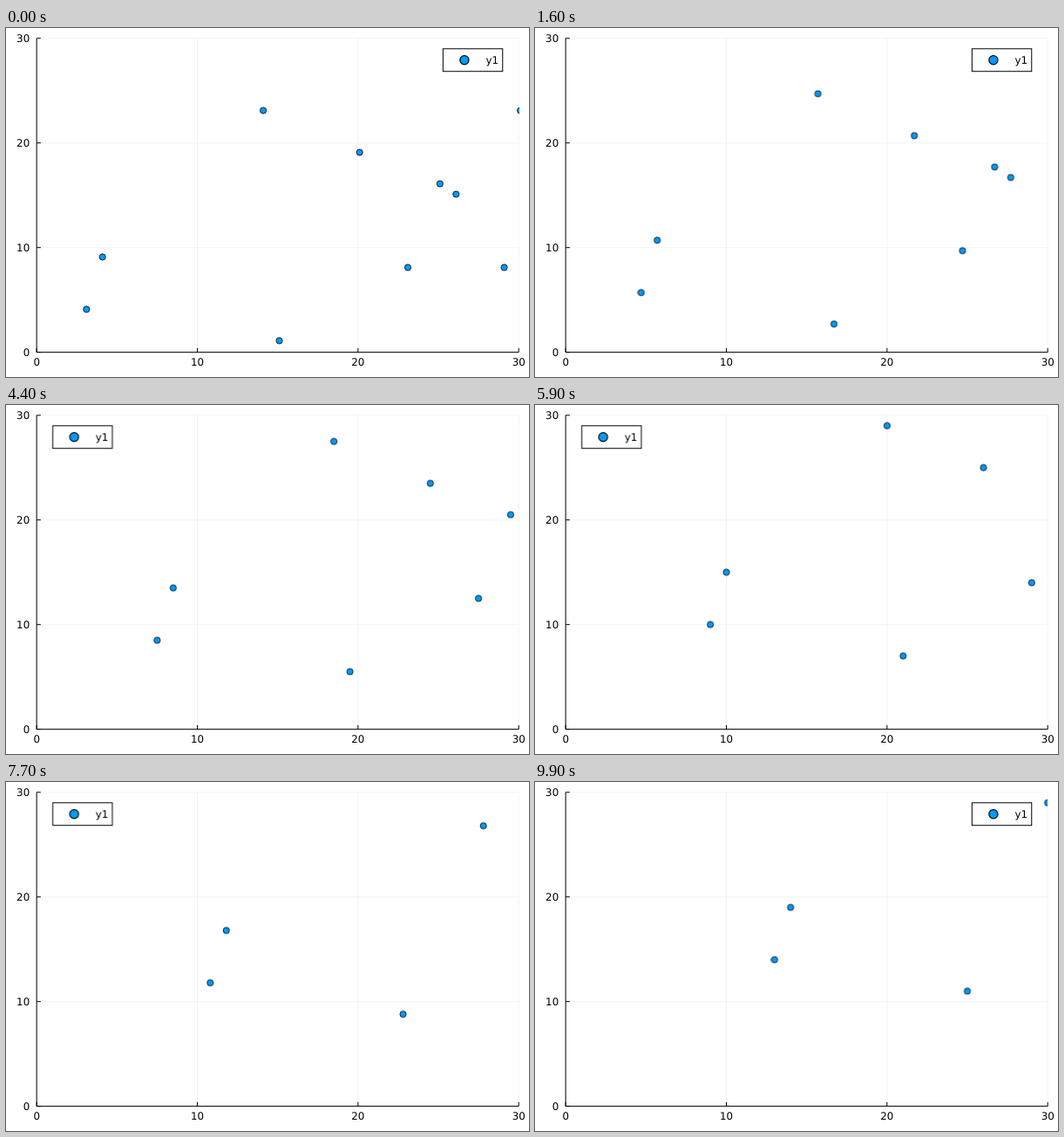
An HTML page for the animation above (10000 ms loop, 600x400 px).

```html
<!DOCTYPE html>
<html lang="en">
<head>
<meta charset="utf-8">
<title>Drifting scatter plot</title>
<style>
  html, body { margin: 0; width: 100%; height: 100%; overflow: hidden; background: #fff; }
  svg { display: block; width: 600px; height: 400px; }
  text { font: 11.86px "DejaVu Sans", Verdana, sans-serif; text-rendering: geometricPrecision; }
  .grid { stroke: #000; stroke-opacity: .1; stroke-width: .5; }
  .axis { stroke: #000; stroke-width: 1; }
  circle { fill: #009afa; stroke: #000; stroke-width: .8; }
  #points { animation: drift 10s steps(100, end) infinite; }
  #legend { animation: dodge 10s step-end infinite; }
  #legend rect { fill: #fff; stroke: #000; }
  #legend circle { stroke-width: 1.14; }

  /* Ten units right and up: one tenth of a unit per step */
  @keyframes drift {
    to { transform: translate(184.339px, -119.934px); }
  }
  /* The legend sits on the left while a point occupies the top right corner */
  @keyframes dodge {
    0%, 99%, 100% { transform: translate(0, 0); }
    34% { transform: translate(-447.73px, 0); }
  }
</style>
</head>
<body>
<svg viewBox="0 0 600 400">
  <defs>
    <clipPath id="area"><rect x="35.17" y="11.81" width="553.02" height="359.8"/></clipPath>
  </defs>
  <g id="axes"></g>
  <g clip-path="url(#area)"><g id="points"></g></g>
  <g id="legend">
    <rect x="501.34" y="23.8" width="68.42" height="25.92"/>
    <circle cx="525.9" cy="36.77" r="5.12"/>
    <text x="550.5" y="41.08">y1</text>
  </g>
</svg>
<script>
  const left = 35.17, right = 588.19, top_ = 11.81, bottom = 371.61;
  const px = v => left + v * (right - left) / 30;
  const py = v => bottom - v * (bottom - top_) / 30;

  const axes = document.getElementById('axes');
  const points = document.getElementById('points');

  function add(parent, tag, attrs, text = '') {
    const el = document.createElementNS('http://www.w3.org/2000/svg', tag);
    for (const key in attrs) el.setAttribute(key, attrs[key]);
    el.textContent = text;
    parent.append(el);
  }
  const line = (cls, x1, y1, x2, y2) => add(axes, 'line', { class: cls, x1, y1, x2, y2 });
  const label = (x, y, anchor, text) => add(axes, 'text', { x, y, 'text-anchor': anchor }, text);

  const ticks = [0, 10, 20, 30];
  for (const v of ticks) {
    line('grid', px(v), top_, px(v), bottom);
    line('grid', left, py(v), right, py(v));
  }
  line('axis', left, bottom, right, bottom);
  line('axis', left, top_, left, bottom);
  for (const v of ticks) {
    line('axis', px(v), bottom, px(v), bottom - 4.72);
    line('axis', left, py(v), left + 4.72, py(v));
    label(px(v), 387.2, 'middle', v);
    label(27.2, py(v) + 4.32, 'end', v);
  }

  const starts = [[3, 4], [4, 9], [14, 23], [15, 1], [20, 19],
                  [23, 8], [25, 16], [26, 15], [29, 8], [30, 23]];
  for (const [x, y] of starts) {
    add(points, 'circle', { cx: px(x + .1), cy: py(y + .1), r: 3.6 });
  }
</script>
</body>
</html>
```
